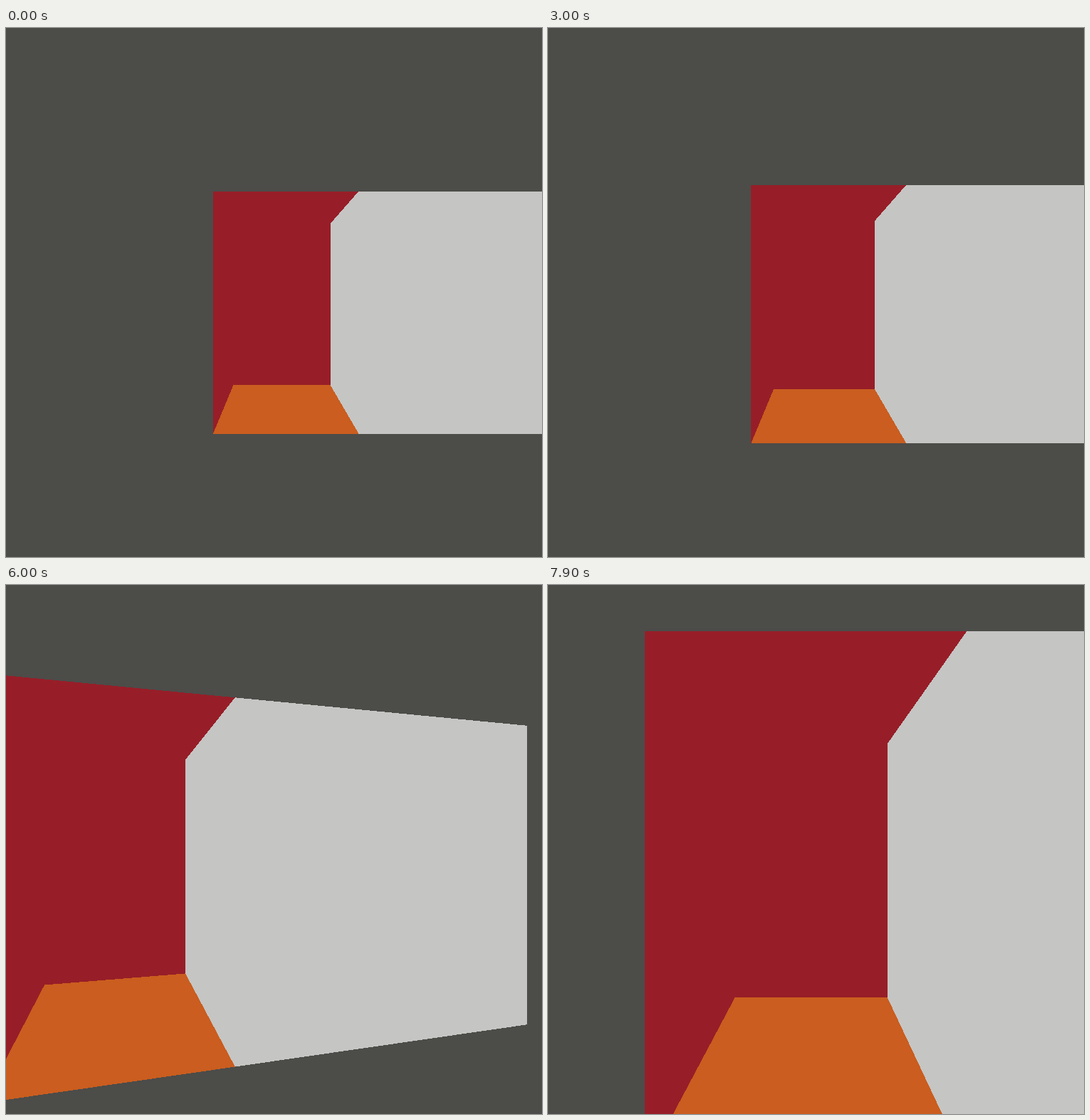
An HTML page that plays this animation: 753x744 px, repeating every 8000 ms.

```html
<!DOCTYPE html>
<html lang="en">
<head>
<meta charset="utf-8">
<title>Walk into a niche</title>
<style>
html, body { margin: 0; width: 100%; height: 100%; overflow: hidden; background: #4c4c49; }
svg { display: block; }
</style>
</head>
<body>
<svg width="753" height="744" shape-rendering="crispEdges">
  <polygon id="opening" fill="#971e28"/>
  <polygon id="floor" fill="#ca5d1f"/>
  <polygon id="wall" fill="#c5c5c3"/>
</svg>
<script>
const LOOP = 8000, TICK = 100;
const FOCAL = 680, CX = 376.2, CY = 366;

// The niche: 3 wide, 5 high, 5 deep, with a 5 wide panel to its right.
const LEFT = -1.25, CORNER = LEFT + 3, RIGHT = CORNER + 5;
const TOP = -2, FLOOR = 3, DEPTH = 5;

// The walker turns by a fixed angle on some ticks and, once started, takes a step every tick.
const DISTANCE = 9.97, PACE = 0.1004, WALK_TICK = 25, TURN = 0.1565;
const rightTurns = [11, 12, 13, 14, 52, 53, 78];
const leftTurns = [17, 18, 20, 20, 62, 71, 72];

function cameraAt(tick) {
  const count = turns => turns.filter(n => n <= tick).length;
  const yaw = TURN * (count(rightTurns) - count(leftTurns));
  const sin = Math.sin(yaw), cos = Math.cos(yaw);
  if (tick < WALK_TICK) return { x: 0, z: -DISTANCE, sin, cos };
  const last = cameraAt(tick - 1);
  return { x: last.x + PACE * last.sin, z: last.z + PACE * last.cos, sin, cos };
}

function project(cam, [x, y, z]) {
  const dx = x - cam.x, dz = z - cam.z;
  const scale = FOCAL / (dx * cam.sin + dz * cam.cos);
  return [CX + (dx * cam.cos - dz * cam.sin) * scale, CY + y * scale];
}

function shape(cam, id, points) {
  document.getElementById(id).setAttribute('points', points.map(p => project(cam, p)).join(' '));
}

function draw(time) {
  const cam = cameraAt(Math.floor(time / TICK));
  shape(cam, 'opening', [
    [LEFT, TOP, 0], [CORNER, TOP, 0], [CORNER, FLOOR, 0], [LEFT, FLOOR, 0]
  ]);
  shape(cam, 'floor', [
    [LEFT, FLOOR, 0], [LEFT, FLOOR, DEPTH], [CORNER, FLOOR, DEPTH], [CORNER, FLOOR, 0]
  ]);
  shape(cam, 'wall', [
    [CORNER, TOP, DEPTH], [CORNER, TOP, 0], [RIGHT, TOP, 0],
    [RIGHT, FLOOR, 0], [CORNER, FLOOR, 0], [CORNER, FLOOR, DEPTH]
  ]);
}

const start = performance.now();
function frame() {
  draw((performance.now() - start) % LOOP);
  requestAnimationFrame(frame);
}
frame();
</script>
</body>
</html>
```
